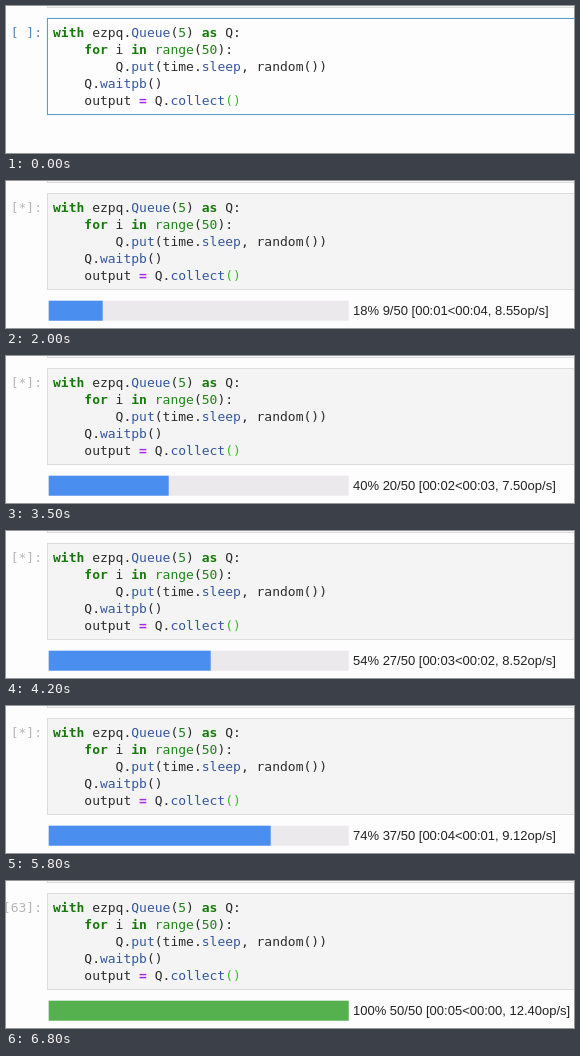
These frames come from a looping animation (568x147 px, 8400 ms). An HTML page:

```html
<!DOCTYPE html>
<html lang="en">
<head>
<meta charset="utf-8">
<title>Notebook progress bar</title>
<style>
  html, body { margin: 0; width: 100%; height: 100%; overflow: hidden; background: #fefdfe; }
  #stage { position: relative; width: 568px; height: 147px; overflow: hidden; }
  #stage > * { position: absolute; box-sizing: border-box; }
  .cell { left: 41px; width: 540px; border: 1px solid #dcdcdc; background: #f4f4f4; }
  #above { top: -20px; height: 22px; }
  #code { top: 12px; height: 97px; }
  .editing #code { border-color: #5b9fcb; background: #fefdfe; box-shadow: 0 0 1px #a9d0e6; }
  pre, #prompt { margin: 0; font: 13px/17px "DejaVu Sans Mono", monospace; white-space: pre; }
  pre { left: 47px; top: 18px; color: #2a2a2a; }
  pre b { color: #147a08; }
  pre b.op { color: #a528f0; }
  pre i { font-style: normal; color: #33569e; }
  pre .num { color: #1f8618; }
  pre .match { color: #3cb82a; }
  #prompt { right: 532px; top: 18px; color: #b5b5b7; }
  .editing #prompt { color: #4c86b8; }
  #cursor { left: 235px; top: 86px; width: 2px; height: 17px; background: #222; }
  svg { left: 0; top: 0; }
  #track { fill: #ebe9ec; }
  #bar { fill: #4a8ff0; }
  .done #bar { fill: #55b04e; }
  #label { left: 347px; top: 120px; color: #222; white-space: nowrap;
           font: 13px/20px "Liberation Sans", Arial, sans-serif; }
</style>
</head>
<body>
<div id="stage">
  <div class="cell" id="above"></div>
  <div class="cell" id="code"></div>
  <div id="prompt"></div>
  <pre><b>with</b> ezpq.<i>Queue</i>(<span class="num">5</span>) <b>as</b> Q:
    <b>for</b> i <b>in</b> <span class="num">range</span>(<span class="num">50</span>):
        Q.<i>put</i>(time.<i>sleep</i>, random())
    Q.<i>waitpb</i>()
    output <b class="op">=</b> Q.<i>collect</i><span class="match">()</span></pre>
  <div id="cursor"></div>
  <svg id="progress" width="568" height="147">
    <rect id="track" x="42.7" y="119.7" width="300" height="20"/>
    <rect id="bar" x="42.7" y="119.7" width="0" height="20"/>
  </svg>
  <div id="label"></div>
</div>
<script>
const LOOP = 8400, RUN = 800, START = 1000, DONE = 6800, TOTAL = 50, POLL = 100;

// Milestones of the run: time in ms, finished jobs, jobs per second
const milestones = [
  [START, 0, 5], [2000, 9, 8.55], [2800, 16, 10.37], [3500, 20, 7.501],
  [4300, 29, 8.67], [5100, 33, 6.87], [5400, 37, 9.12], [6400, 46, 9.04],
  [DONE, TOTAL, 12.4]
];

const el = id => document.getElementById(id);
const [stage, prompt, cursor, progress, bar, label] =
  ["stage", "prompt", "cursor", "progress", "bar", "label"].map(el);

const clock = s => "00:" + String(Math.floor(s)).padStart(2, "0");
const show = (node, on) => { node.style.visibility = on ? "visible" : "hidden"; };
const mix = (a, b, p) => a + (b - a) * p;

// Workers stay busy for the first half of each stretch, then jobs finish steadily.
function measure(t) {
  const next = milestones.findIndex(m => m[0] > t);
  if (next < 0) return milestones.at(-1);
  const from = milestones[next - 1], to = milestones[next];
  const polled = Math.floor(t / POLL) * POLL;
  const p = (polled - from[0]) / (to[0] - from[0]);
  if (p < 0.5) return from;
  const [time, n, rate] = from.map((value, i) => mix(value, to[i], p));
  return [time, Math.floor(n + 1e-6), rate];
}

function status([time, n, rate]) {
  const percent = `${n * 100 / TOTAL}% ${n}/${TOTAL}`;
  if (!n) return `${percent} [00:00<?, ?op/s]`;
  const left = clock((TOTAL - n) / rate);
  return `${percent} [${clock((time - 900) / 1000)}<${left}, ${rate.toFixed(2)}op/s]`;
}

function draw(t) {
  const editing = t < RUN, done = t >= DONE, started = t >= START;
  stage.className = editing ? "editing" : done ? "done" : "";
  prompt.textContent = editing ? "[ ]:" : done ? "[63]:" : "[*]:";
  show(cursor, t >= 200 && editing);
  show(progress, started);
  show(label, started);
  if (!started) return;
  const now = measure(t);
  bar.setAttribute("width", now[1] * 300 / TOTAL);
  label.textContent = status(now);
}

const begin = performance.now();
function tick() {
  draw((performance.now() - begin) % LOOP);
  requestAnimationFrame(tick);
}
tick();
</script>
</body>
</html>
```
